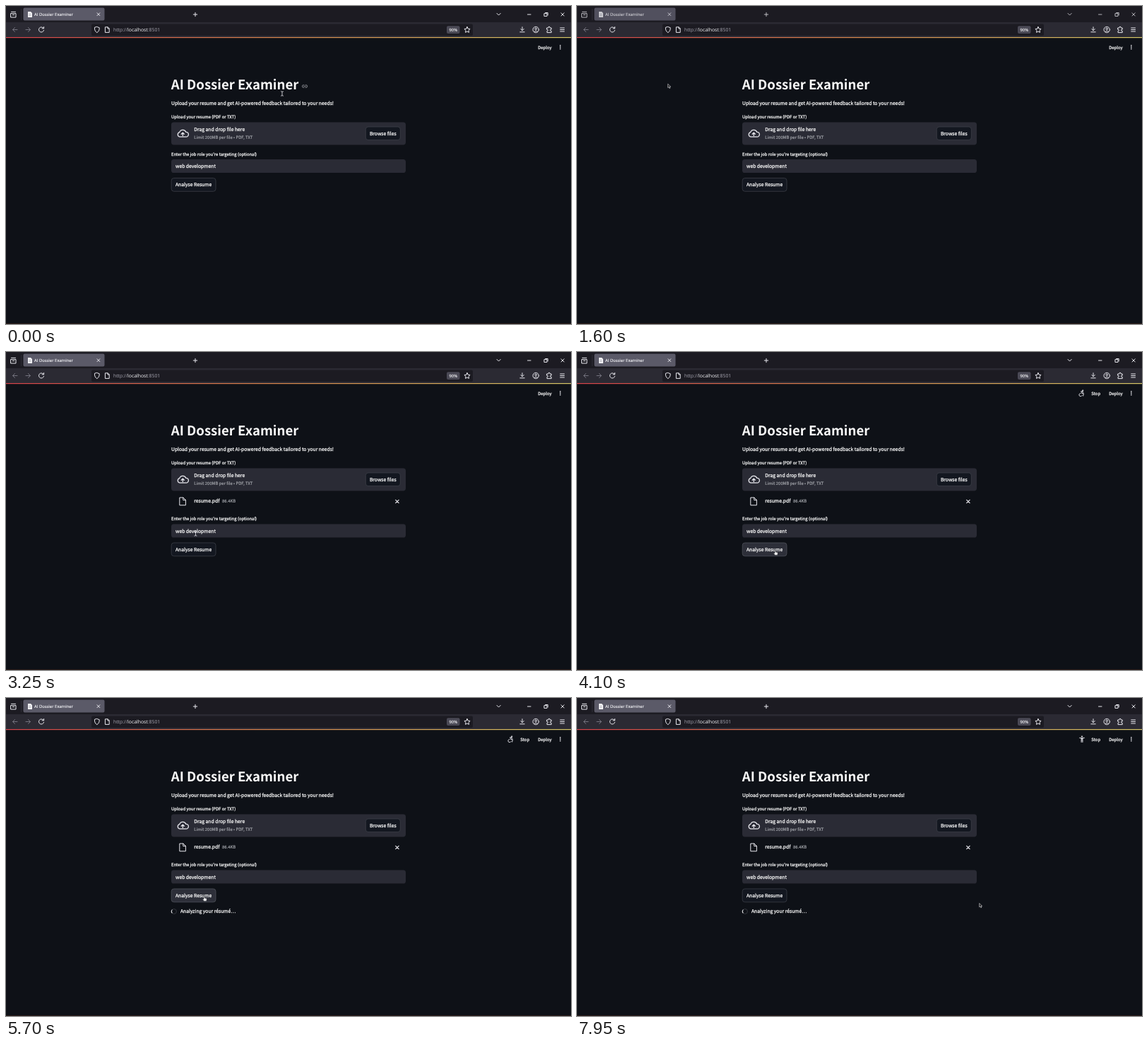
Recreate the animation shown at these times as an HTML page. Size 800 by 450 pixels, loop 8 s.

```html
<!DOCTYPE html>
<html lang="en">
<head>
<meta charset="utf-8">
<title>AI Dossier Examiner</title>
<style>
  html, body { margin: 0; width: 100%; height: 100%; overflow: hidden; background: #0e1117; }
  svg { display: block; width: 800px; height: 450px; }
  text {
    font: 6.77px "Noto Sans CJK JP", "Noto Sans CJK SC", "Noto Sans", sans-serif;
    fill: #fafafa; stroke: #fafafa; stroke-width: .25; text-rendering: geometricPrecision;
  }
  .small { font-size: 5.93px; }
  .dim { fill: #a9abb1; stroke: #a9abb1; stroke-width: .15; }
  .mid { text-anchor: middle; }
  .title { font-size: 18.6px; font-weight: 700; stroke: none; }
  .chrome text { font: 5.9px "Open Sans", "Noto Sans", sans-serif; fill: #f8f8fc; stroke-width: .12; }
  .chrome .url { font-size: 6.85px; fill: #a9a8b3; stroke: none; }
  .line { fill: none; stroke: #e8e8ee; stroke-width: 1; stroke-linecap: round; stroke-linejoin: round; }
  .field { fill: #2a2b35; }
  .button { fill: #131720; stroke: #41444c; stroke-width: .7; }
  .button.hover { fill: #2d2f39; stroke: #555861; }
  #tab { fill: #5b5a68; }
  .blurred #tab { fill: #51505e; }
  .blurred .strip { opacity: .75; }
</style>
</head>
<body>
<svg id="stage" viewBox="0 0 800 450">
  <defs>
    <linearGradient id="accent">
      <stop offset="0" stop-color="#d8434b"/>
      <stop offset=".5" stop-color="#d98a4e"/>
      <stop offset="1" stop-color="#d6c767"/>
    </linearGradient>
  </defs>
  <rect width="800" height="450" fill="#0e1117"/>

  <g class="chrome">
    <rect width="800" height="23" fill="#1c1b22"/>
    <rect y="23" width="800" height="21" fill="#2b2a33"/>
    <rect x="21" y="4" width=".6" height="16" fill="#3a3944"/>
    <rect id="tab" x="24.5" y="2.5" width="115" height="18" rx="2"/>
    <g class="strip">
      <path d="M31 8h4l2 2v6h-6z" fill="#f2f2f5"/>
      <path d="M32.3 11.5h3M32.3 13.5h3" stroke="#8c8c96" stroke-width=".6"/>
      <text x="40" y="14.2">AI Dossier Examiner</text>
      <g class="line">
        <path d="M7 10.5h7v5.5h-7zM7.5 8.3h6M9.3 12.5h2.4"/>
        <path d="M129 9.8l3.8 3.8M132.8 9.8l-3.8 3.8M265.3 12h5.4M268 9.3v5.4M695 10.4l2.6 2.6 2.6-2.6"/>
        <path d="M738.5 12h4.5M762.3 10.7h3.7v3.7h-3.7zM763.7 9.5h3.5v3.5M786 9.8l4.2 4.2M790.2 9.8l-4.2 4.2"/>
      </g>
    </g>
    <rect x="121" y="25.5" width="540" height="16.5" rx="2" fill="#1c1b22"/>
    <text class="url" x="152" y="36.4">http://<tspan fill="#fbfbfe">localhost</tspan>:8501</text>
    <rect x="624" y="28.3" width="18.5" height="10.8" rx="2" fill="#4a4955"/>
    <text class="mid" x="633.2" y="36">90%</text>
    <g class="line">
      <path d="M16 33.5h-6.5m3-3l-3 3 3 3M28 33.5h6.5m-3-3l3 3-3 3" style="stroke:#74737e"/>
      <path d="M53 31.3a3.6 3.6 0 1 0 .6 3M53.6 29.5v2.3h-2.4"/>
      <path d="M128.8 29.5l3.4 1.2c.2 3.4-1 5.5-3.4 6.9-2.4-1.4-3.6-3.5-3.4-6.9z"/>
      <path d="M140.8 29.8h3.4l2 2v5.6h-5.4zM144 30v2h2"/>
      <path d="M653 29.5l1.2 2.6 2.9.4-2.1 2 .5 2.9-2.5-1.4-2.5 1.4.5-2.9-2.1-2 2.9-.4z"/>
      <path d="M731 29.7v5m-2.2-2.2l2.2 2.2 2.2-2.2M727.8 36.8h6.4"/>
      <circle cx="750.2" cy="33.5" r="4.2"/><circle cx="750.2" cy="32.3" r="1.3"/>
      <path d="M747.7 36.3q2.5-2.3 5 0"/>
      <path d="M766 31h1.8q-.2-1.8 1.2-1.8t1.2 1.8h2v2.2q-1.8-.2-1.8 1.1t1.8 1.1v2.2H766v-2.2q1.5 0 1.5-1.1t-1.5-1.1z"/>
      <path d="M784.7 31h5.8M784.7 33.5h5.8M784.7 36h5.8"/>
    </g>
  </g>
  <rect y="44" width="800" height="1.2" fill="url(#accent)"/>
  <rect y="449" width="800" height="1" fill="#2c1c18"/>

  <text class="small" x="753.2" y="60.6">Deploy</text>
  <path d="M784.8 55.8h.01M784.8 58.2h.01M784.8 60.6h.01" class="line" style="stroke-width:1.7"/>
  <g id="running">
    <g transform="translate(715 58.3)">
      <circle id="head" r="1.1" fill="#e4e4ea"/>
      <path id="limbs" class="line"/>
    </g>
    <text class="small" x="728.3" y="60.6">Stop</text>
  </g>

  <text class="title" x="233.8" y="118">AI Dossier Examiner</text>
  <path id="link" class="line" style="stroke:#a3a5ab;stroke-width:.8" d="M422 111.8h-.8a1.8 1.8 0 0 0 0 3.6h.8M424 111.8h.8a1.8 1.8 0 0 1 0 3.6h-.8M421.6 113.6h2.8"/>
  <text x="234" y="140">Upload your resume and get AI-powered feedback tailored to your needs!</text>
  <text class="small" x="234" y="158.7">Upload your resume (PDF or TXT)</text>
  <rect class="field" x="234" y="164.4" width="332" height="32" rx="3.6"/>
  <path class="line" style="stroke-width:1.3" d="M246 185.2a3.4 3.4 0 0 1-.3-6.6 4.9 4.9 0 0 1 9.2-.2 3.3 3.3 0 0 1 .2 6.8zM250.3 183.6v-4.3m-2 1.9l2-2 2 2"/>
  <text x="266.3" y="177.4">Drag and drop file here</text>
  <text class="small dim" x="266.3" y="188.3">Limit 200MB per file • PDF, TXT</text>
  <rect id="browse" class="button" x="509.3" y="171" width="49" height="18.6" rx="3.6"/>
  <text class="mid" x="533.8" y="182.7">Browse files</text>

  <g id="file">
    <path class="line" d="M246.2 206h4.8l3.4 3.4v7.4h-8.2zM250.8 206.2v3.4h3.4"/>
    <text x="266.3" y="213.4">resume.pdf</text>
    <text class="small dim" x="306" y="213.2">86.4KB</text>
    <path class="line" d="M551.7 209.3l4.4 4.4M556.1 209.3l-4.4 4.4" style="stroke-width:1.2"/>
  </g>

  <g id="form">
    <text class="small" x="234" y="211.8">Enter the job role you're targeting (optional)</text>
    <rect class="field" x="234" y="217" width="332" height="19" rx="3.6"/>
    <text x="240" y="229">web development</text>
    <rect id="analyse" class="button" x="234.2" y="243.5" width="62.8" height="18.8" rx="3.6"/>
    <text class="mid" x="265.6" y="255.4">Analyse Resume</text>
  </g>

  <g id="progress">
    <g transform="translate(237.9 302)" fill="none" stroke-width="1">
      <circle r="3.5" stroke="#33363d"/>
      <path id="spinner" d="M2.47-2.47A3.5 3.5 0 0 1 2.47 2.47" stroke="#f0f0f2"/>
    </g>
    <text x="247" y="304.4">Analyzing your résumé…</text>
  </g>

  <g id="cursor">
    <path id="arrow" d="M-1.3-3v5.3l1.2-1.1 1 2.1 1-.5-1-1.9h1.8z" fill="#111" stroke="#e8e8ec" stroke-width=".6"/>
    <path id="beam" class="line" style="stroke-width:.8" d="M-1.5-3.2q1.5 0 1.5.7 0-.7 1.5-.7M0-2.5v5M-1.5 3.2q1.5 0 1.5-.7 0 .7 1.5.7"/>
    <path id="hand" d="M-1.5-3.6q.6-.6 1.2 0v2.6l2.4.6q.9.3.7 1.3l-.5 2.5h-3.4l-1.9-2.5q.3-1 1.5-.2z" fill="#f4f4f6" stroke="#16181e" stroke-width=".5"/>
  </g>
</svg>
<script>
const LOOP = 8000;
// The window loses focus while the file dialog is open.
const DIALOG_OPENED = 800, FILE_ADDED = 2750;
const RUN_STARTED = 3600, SPINNER_SHOWN = 4400;
const FILE_ROW = 26.5;

// time, x, y
const route = [
  [0, 391, 124], [50, 391, 124], [600, 530, 182], [850, 530, 182], [1500, 130, 113.3], [1700, 130, 113.3],
  [2350, 345, 270], [2800, 345, 270], [3200, 268.5, 257], [3270, 268.5, 257],
  [3450, 281.5, 284], [7200, 281.5, 284], [7800, 571, 293.5], [LOOP, 571, 293.5]
];

// head x, head y, limbs; one pose every POSE_TIME
const POSE_TIME = 200;
const poses = [
  [1.8, -3.8, "M-2.5-1l2-1.3 1.5.3-1 2.5 1.5 1.5v2.2M0 .5l-1 2-2.6.8M1-2l1.3 1.4 1.5.2"],
  [1.2, -3.8, "M-.8-1.8l1.6-.2 1.2 1.5h1.5M-.8-1.8l1.5 2v2.5M-4.3 2.5a1.7 1.7 0 1 0 3.4 0a1.7 1.7 0 1 0-3.4 0M1 2.5a1.7 1.7 0 1 0 3.4 0a1.7 1.7 0 1 0-3.4 0"],
  [2.8, -.8, "M-3-2.2l2.2-.3L1.5.8M-4 2.2q1.3-1.2 2.6 0t2.6 0 2.6 0"],
  [.5, -3.8, "M-2-.5l.7-1.4 1.5-.2 1 1.6 1.5.4M0-2l-.5 3 1.5 1.5.4 2M-.5 1l-.8 3.4"],
  [1.2, -3.8, "M-1.6-2.2l2-.4L-.5 0l2.8.4-.6 3.4M.4-2.6l1.6 1.4M-2.2.1a2.2 2.2 0 1 0 2.2 3.3"],
  [.4, -3.8, "M0-2l-1.5 3h3M-1.5 1l-1 2.5M1.5 1l1.5 2.5M0-1.5l3 1M-4 3.5h8"],
  [.8, -3.8, "M-2.6-2.3l2.6.5.5 2.3-1.8 1.5-1 2M.5.5l1.7 1.6.7 2.2M0-1.8l2.7-.5"],
  [0, -3.8, "M-3.3-1.8q3.3.8 6.6 0M-.9-1.4v5.6M.9-1.4v5.6M-.5-.8h1M-.5 1h1"]
];

const el = id => document.getElementById(id);
const show = (id, on) => el(id).setAttribute("visibility", on ? "visible" : "hidden");
const inside = ([x, y], left, top, right, bottom) => x >= left && x <= right && y >= top && y <= bottom;

function cursorAt(t) {
  const next = route.findIndex(point => point[0] > t);
  const [t0, x0, y0] = route[next - 1], [t1, x1, y1] = route[next];
  const k = (t - t0) / (t1 - t0), eased = k * k * (3 - 2 * k);
  return [x0 + (x1 - x0) * eased, y0 + (y1 - y0) * eased];
}

function render(t) {
  const dialogOpen = t >= DIALOG_OPENED && t < FILE_ADDED;
  const shift = t >= FILE_ADDED ? FILE_ROW : 0;
  el("stage").classList.toggle("blurred", dialogOpen);
  show("file", shift > 0);
  show("running", t >= RUN_STARTED);
  show("progress", t >= SPINNER_SHOWN);
  el("form").setAttribute("transform", `translate(0 ${shift})`);

  const cursor = cursorAt(t);
  const over = (...box) => !dialogOpen && inside(cursor, ...box);
  const onBrowse = over(509, 171, 558, 190);
  const onAnalyse = over(234, 243 + shift, 297, 263 + shift);
  const onTitle = over(234, 98, 566, 127);
  const onText = onTitle || over(234, 132, 464, 143) || over(234, 217 + shift, 566, 236 + shift);
  const shape = onBrowse || onAnalyse ? "hand" : onText ? "beam" : "arrow";
  for (const id of ["arrow", "beam", "hand"]) show(id, id === shape);
  show("link", onTitle);
  el("browse").classList.toggle("hover", onBrowse);
  el("analyse").classList.toggle("hover", onAnalyse);
  el("cursor").setAttribute("transform", `translate(${cursor})`);

  const [headX, headY, limbs] = poses[Math.floor(t / POSE_TIME) % poses.length];
  el("head").setAttribute("cx", headX);
  el("head").setAttribute("cy", headY);
  el("limbs").setAttribute("d", limbs);
  el("spinner").setAttribute("transform", `rotate(${(t - 4950) / 750 * 360 + 180})`);
}

const start = performance.now();
function tick() {
  render(Math.max(0, performance.now() - start) % LOOP);
  requestAnimationFrame(tick);
}
tick();
</script>
</body>
</html>
```
